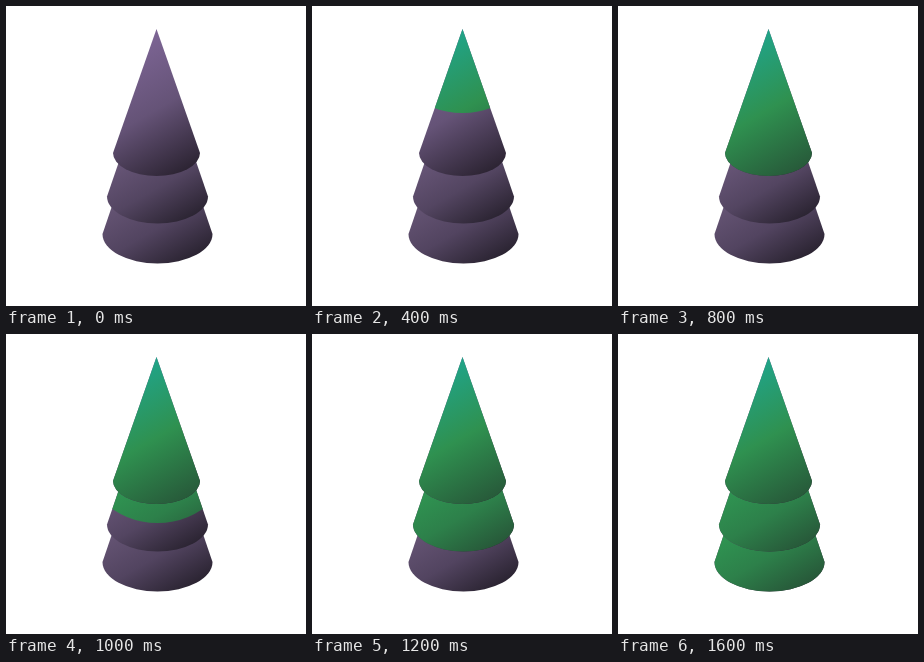
Write an HTML page that moves like this. It is 300 by 300 pixels and loops after 1.7 s.

```html
<!DOCTYPE html>
<html lang="en">
<head>
<meta charset="utf-8">
<title>Tree filling up</title>
<style>
html, body { margin: 0; width: 100%; height: 100%; overflow: hidden; background: #fff; }
svg { display: block; width: 100vw; height: 100vh; }
</style>
</head>
<body>
<svg id="stage" viewBox="0 0 300 300"></svg>
<script>
const LOOP = 1700, STEP = 100, CURVE = 80;
const stage = document.getElementById('stage');

// Drawn from the bottom tier up; keys are [time, lowest point of the green].
const tiers = [
  { cx: 151.5, apex: 66, base: 228, rx: 55, ry: 29.5, from: [105, 200], len: 85,
    green: ['#2f9552', '#2d804a', '#275839'], dark: ['#655474', '#524460', '#2b2432'],
    keys: [[1200, 211], [1600, 260]] },
  { cx: 151.5, apex: 43, base: 190.5, rx: 50.5, ry: 27, from: [113, 155], len: 85,
    green: ['#2f9552', '#2d804a', '#275839'], dark: ['#685678', '#534561', '#2b2432'],
    keys: [[800, 160], [1000, 189], [1200, 220]] },
  { cx: 150.5, apex: 23, base: 147, rx: 43.5, ry: 23, from: [150, 23], len: 140,
    green: ['#20a489', '#2f9150', '#275839'], dark: ['#7d6595', '#655377', '#2a2230'],
    keys: [[0, 23], [400, 107], [600, 136], [800, 172]] }
];

function add(parent, name, attrs) {
  const el = document.createElementNS('http://www.w3.org/2000/svg', name);
  for (const key in attrs) el.setAttribute(key, attrs[key]);
  return parent.appendChild(el);
}

function gradient(id, tier, colors) {
  const [x, y] = tier.from;
  const g = add(stage, 'linearGradient', {
    id, gradientUnits: 'userSpaceOnUse',
    x1: x, y1: y, x2: x + tier.len * 0.5, y2: y + tier.len * 0.866
  });
  colors.forEach((c, i) => add(g, 'stop', { offset: i / 2, 'stop-color': c }));
}

function conePath({ cx, apex, base, rx, ry }) {
  return `M${cx} ${apex}L${cx + rx} ${base}A${rx} ${ry} 0 0 1 ${cx - rx} ${base}Z`;
}

// Everything above a downward bulging edge
function fillPath(cx, level) {
  const y = level - CURVE;
  return `M0 -300H300V${y}H${cx + CURVE}A${CURVE} ${CURVE} 0 0 1 ${cx - CURVE} ${y}H0Z`;
}

function levelAt(keys, t) {
  if (t <= keys[0][0]) return keys[0][1];
  for (let i = 1; i < keys.length; i++) {
    const [t0, y0] = keys[i - 1], [t1, y1] = keys[i];
    if (t <= t1) return y0 + (y1 - y0) * (t - t0) / (t1 - t0);
  }
  return keys[keys.length - 1][1];
}

tiers.forEach((tier, i) => {
  gradient('dark' + i, tier, tier.dark);
  gradient('green' + i, tier, tier.green);
  tier.clip = add(add(stage, 'clipPath', { id: 'clip' + i }), 'path', {});
  const d = conePath(tier);
  add(stage, 'path', { d, fill: `url(#dark${i})` });
  tier.lit = add(stage, 'path', { d, fill: `url(#green${i})`, 'clip-path': `url(#clip${i})` });
  tier.full = d;
});

function draw(t) {
  for (const tier of tiers) {
    const start = tier.keys[0][0], end = tier.keys[tier.keys.length - 1][0];
    tier.lit.style.display = t > start ? '' : 'none';
    // A finished tier is shown whole, without the moving edge
    tier.clip.setAttribute('d', t >= end
      ? 'M0 0H300V300H0Z'
      : fillPath(tier.cx, levelAt(tier.keys, t)));
  }
}

const begin = performance.now();
function tick() {
  const t = (performance.now() - begin) % LOOP;
  draw(Math.floor(t / STEP) * STEP);
  requestAnimationFrame(tick);
}
tick();
</script>
</body>
</html>
```
